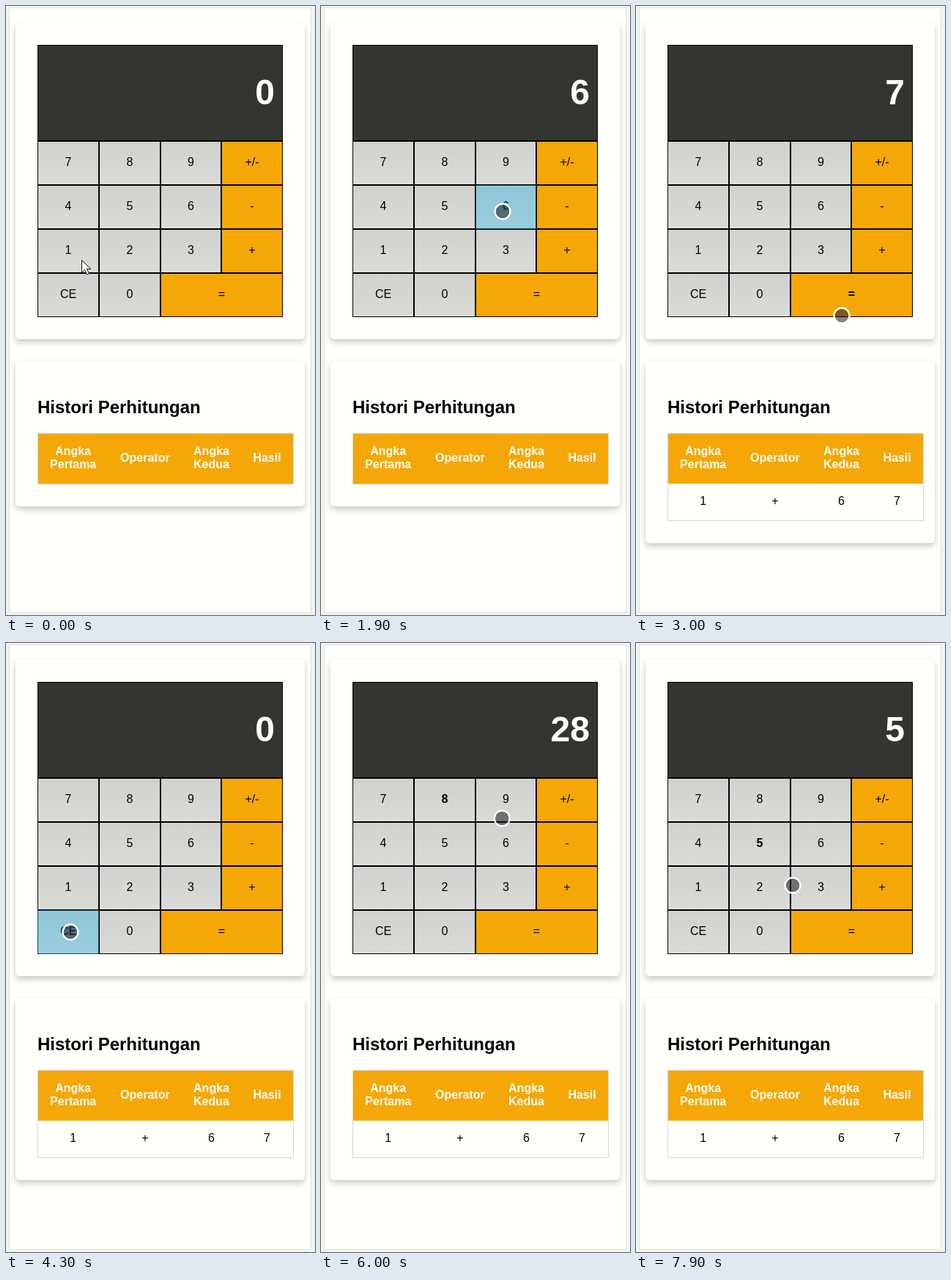
Write an HTML page that moves like this. It is 422 px wide and 830 px high and loops after 8000 ms.

```html
<!DOCTYPE html>
<html lang="id">
<head>
<meta charset="utf-8">
<title>Kalkulator</title>
<style>
  html, body { margin: 0; width: 100%; height: 100%; overflow: hidden; background: #f4f4ef; }
  svg { display: block; font: 16px "Liberation Sans", Arial, sans-serif; }
  .card { fill: #fffffc; filter: drop-shadow(0 4px 4px rgba(0, 0, 0, .22)); }
  .mid { text-anchor: middle; }
  .bold { font-weight: bold; }
  .head { fill: #fffff8; font-weight: bold; }
</style>
</head>
<body>
<svg width="422" height="830" viewBox="0 0 422 830">
  <defs>
    <linearGradient id="gray" x2="0" y2="1">
      <stop stop-color="#d0d0ce"/><stop offset="1" stop-color="#dbdbd8"/>
    </linearGradient>
  </defs>
  <rect x="4.5" y="2.5" width="412" height="824" fill="#fffffc" stroke="#dfdfd9"/>

  <rect class="card" x="13" y="23" width="395" height="431" rx="5"/>
  <rect x="43.5" y="53.5" width="334" height="130" fill="#343431" stroke="#000"/>
  <text id="display" class="bold" x="367" y="134" font-size="48" fill="#fffffc" text-anchor="end">0</text>
  <g id="keys"></g>

  <rect id="historyCard" class="card" x="13" y="484" width="395" height="198" rx="5"/>
  <text class="bold" x="43" y="555" font-size="24">Histori Perhitungan</text>
  <rect x="43" y="582" width="350" height="69" fill="#f4a706"/>
  <rect id="tableBorder" x="43.5" y="582.5" width="349" height="69" fill="none" stroke="#d6d6d2"/>
  <g id="table" class="mid"></g>

  <path id="arrow" d="M103.5 346.5v17l4-4 3 6.5 3-1.3-3-6.2h5.5z" fill="#fff" stroke="#111"/>
  <g id="touch">
    <circle r="9.5" fill="rgba(30,25,30,.55)"/>
    <circle r="10.5" fill="none" stroke="#fffffc" stroke-width="2.3"/>
  </g>
</svg>
<script>
const LOOP = 8000, STEP = 100, TRAVEL = 400;
const $ = id => document.getElementById(id);

function svg(tag, attrs, parent, content = '') {
  const node = document.createElementNS('http://www.w3.org/2000/svg', tag);
  for (const name in attrs) node.setAttribute(name, attrs[name]);
  node.textContent = content;
  return parent.appendChild(node);
}

const keys = {};
const column = c => Math.round(43 + c * 83.75);
const layout = [['7', '8', '9', '+/-'], ['4', '5', '6', '-'], ['1', '2', '3', '+'], ['CE', '0', '=']];
layout.forEach((labels, r) => labels.forEach((label, c) => {
  const x = column(c), y = 184 + r * 60;
  const width = column(label === '=' ? 4 : c + 1) - x;
  const fill = c === 3 || label === '=' ? '#f4a706' : 'url(#gray)';
  svg('rect', { x: x + .5, y: y + .5, width: width - 1, height: 59, fill, stroke: '#000' }, $('keys'));
  const text = svg('text', { class: 'mid', x: x + width / 2, y: y + 34 }, $('keys'), label);
  const glow = svg('rect', { x, y, width, height: 60, fill: '#33b5e5' }, $('keys'));
  keys[label] = { text, glow };
}));

const columns = [
  { x: 91.7, title: 'Angka Pertama', cell: '1' },
  { x: 189.9, title: 'Operator', cell: '+' },
  { x: 280.5, title: 'Angka Kedua', cell: '6' },
  { x: 356.5, title: 'Hasil', cell: '7' }
];
const cells = columns.map(({ x, title, cell }) => {
  const words = title.split(' ');
  words.forEach((word, i) =>
    svg('text', { class: 'head', x, y: 621 + 18 * i - 9 * (words.length - 1) }, $('table'), word));
  return svg('text', { x, y: 680 }, $('table'), cell);
});

const presses = [
  { at: 500, key: '1', shows: '1' },
  { at: 1300, key: '+', shows: '1' },
  { at: 1850, key: '6', shows: '6' },
  { at: 2750, key: '=', shows: '7' },
  { at: 4300, key: 'CE', shows: '0' },
  { at: 4800, key: '2', shows: '2' },
  { at: 5700, key: '8', shows: '28' },
  { at: 6600, key: '-', shows: '28' },
  { at: 7650, key: '5', shows: '5' }
];

const moves = [
  { leave: 50, x: 95, y: 336 },
  { leave: 620, x: 342, y: 337 },
  { leave: 1450, x: 248, y: 280 },
  { leave: 2100, x: 281, y: 422 },
  { leave: 3500, x: 150, y: 407 },
  { leave: 3900, x: 88, y: 394 },
  { leave: 4300, x: 178, y: 343 },
  { leave: 5000, x: 172, y: 214 },
  { leave: 5900, x: 344, y: 271 },
  { leave: 6700, x: 251, y: 271 },
  { leave: 7100, x: 172, y: 271 },
  { leave: 7700, x: 228, y: 350 }
];

const clamp = v => Math.max(0, Math.min(1, v));
const easeOut = k => 1 - (1 - k) ** 2;

function touchAt(t) {
  return moves.reduce(([x, y], move) => {
    const k = easeOut(clamp((t - move.leave) / TRAVEL));
    return [x + (move.x - x) * k, y + (move.y - y) * k];
  }, [104, 345]);
}

function show(node, visible) {
  node.style.display = visible ? '' : 'none';
}

function draw(now) {
  const t = Math.floor(now % LOOP / STEP) * STEP;
  const press = presses.filter(p => p.at <= t).pop() || { shows: '0' };

  $('display').textContent = press.shows;
  for (const label in keys) {
    const { text, glow } = keys[label], active = label === press.key;
    text.setAttribute('font-weight', active ? 'bold' : 'normal');
    glow.setAttribute('opacity', active ? .4 * clamp((230 - t + press.at) / 170) : 0);
  }

  const hasRow = t >= 2800;
  cells.forEach(cell => show(cell, hasRow));
  $('historyCard').setAttribute('height', hasRow ? 248 : 198);
  $('tableBorder').setAttribute('height', hasRow ? 119 : 69);

  const touching = t >= 100;
  show($('arrow'), !touching);
  show($('touch'), touching);
  $('touch').setAttribute('transform', `translate(${touchAt(t)})`);
}

const start = performance.now();
function tick() {
  draw(performance.now() - start);
  requestAnimationFrame(tick);
}
tick();
</script>
</body>
</html>
```
